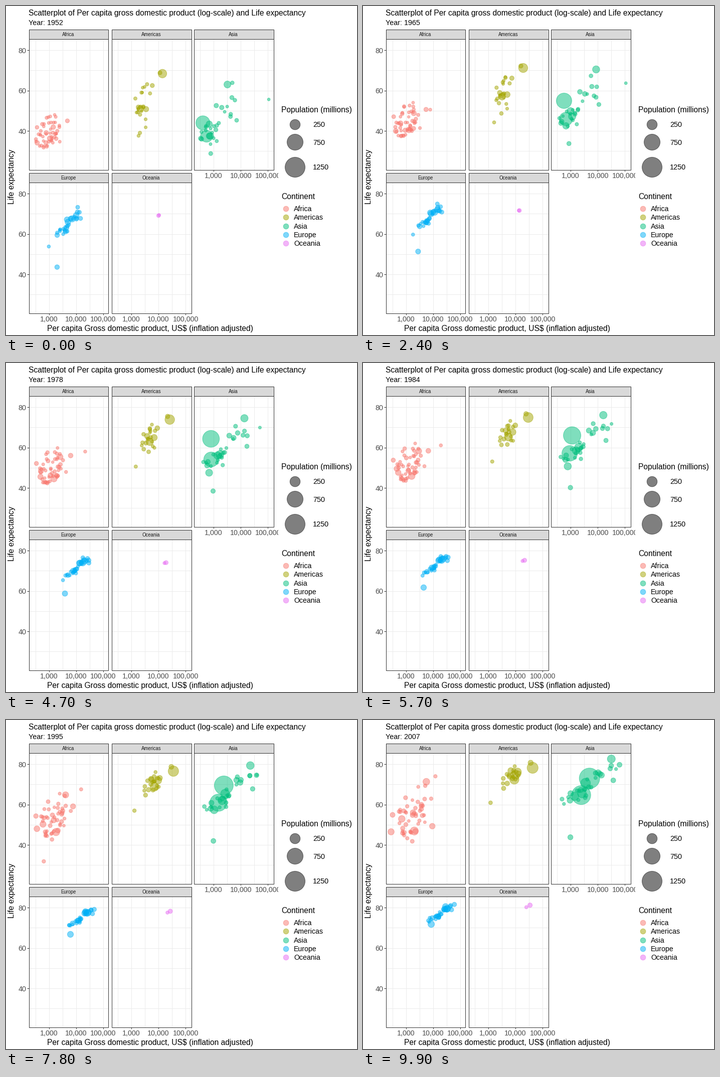
A matplotlib script for the animation above (10000 ms loop, 700x656 px).

```python
import numpy as np
import matplotlib.pyplot as plt
from matplotlib.animation import FuncAnimation
from matplotlib.patches import Rectangle

W, H, DPI = 700, 656, 64
PT = 72 / DPI                      # points per pixel
FRAMES, INTERVAL = 100, 100
FIRST, LAST = 1952, 2007

plt.rcParams["font.family"] = "Liberation Sans"

# Large and outlying bubbles: population in millions (last, or first and last),
# income and life expectancy at the start and the end, then optional bends of
# the path as year, income, life expectancy.
AFRICA = [
    (135, 1077, 36.3, 2014, 46.9, 1982, 1576, 45.8),
    (80, 1419, 41.9, 5581, 71.3),
    (64, 781, 39.1, 278, 46.5),
    (76, 362, 34.1, 691, 52.9),
    (44, 4725, 45, 9270, 49.3, 1992, 7225, 61.9),
    (6, 2388, 42.7, 12057, 74, 1977, 21951, 57.4),
    (9, 493, 40, 863, 46.2, 1987, 848, 44, 1992, 737, 23.6, 1997, 590, 36),
]
AMERICAS = [
    ((157, 301), 13990, 68.4, 42952, 78.2),
    (33, 11367, 68.8, 36319, 80.7),
    (109, 3478, 50.8, 11978, 76.2),
    (190, 2109, 50.9, 9066, 72.4),
    (8.5, 1840, 37.6, 1202, 60.9),
    (40, 5911, 62.5, 12779, 75.3),
]
ASIA = [
    ((556, 1319), 400, 44, 4959, 73, 1962, 488, 48, 1967, 613, 58.4, 1977, 741, 64),
    ((372, 1110), 547, 37.4, 2452, 64.7, 1982, 856, 56.6),
    ((86, 127), 3217, 63, 31656, 82.6, 1967, 9848, 71.4),
    (223, 750, 37.5, 3541, 70.6),
    (150, 684, 37.5, 1391, 64.1, 1977, 660, 46.9),
    (169, 685, 43.4, 2606, 65.5),
    (2.5, 108382, 55.6, 47307, 77.6, 1972, 109348, 67.7, 1982, 31354, 71.3),
    (32, 779, 28.8, 975, 43.8, 1982, 978, 39.9),
    (48, 331, 36.3, 944, 62.1),
]
EUROPE = [
    ((22, 71), 1969, 43.6, 8458, 71.8, 1982, 4241, 61),
    (82, 7144, 67.5, 32170, 79.4),
    (61, 9980, 69.2, 33203, 79.4),
    (58, 4931, 65.9, 28570, 80.5),
    (38, 4029, 61.3, 15390, 75.6, 1982, 8452, 71.3),
    (4.5, 974, 53.8, 7446, 74.9),
]
OCEANIA = [
    ((8.7, 20), 10040, 69.1, 34435, 81.2),
    ((2, 4.1), 10557, 69.4, 25185, 80.2),
]

# colour, column, row, population growth, 1982 bend (income share, life share,
# life lift), large bubbles, then the crowd: count, median population, and for
# start and end the mean log income, its spread, mean life, slope and noise
PANELS = {
    "Africa": ("#F8766D", 0, 0, 3.6, (.5, .22, 9), AFRICA,
               (45, 8, (2.99, .27, 39, 5, 4.4), (3.17, .4, 54.5, 9, 6.5))),
    "Americas": ("#A3A500", 1, 0, 2.9, (.64, .64, 0), AMERICAS,
                 (19, 9, (3.47, .18, 53, 24, 7), (3.9, .24, 73.8, 8, 2.2))),
    "Asia": ("#00BF7D", 2, 0, 2.7, (.6, .66, 0), ASIA,
             (24, 14, (3.2, .36, 47, 14, 6), (3.85, .53, 71.5, 9, 3))),
    "Europe": ("#00B0F6", 0, 1, 1.25, (.68, .63, 0), EUROPE,
               (24, 9, (3.73, .24, 65.7, 13, 2), (4.35, .24, 77.8, 9, .9))),
    "Oceania": ("#E76BF3", 1, 1, 2, (.6, .47, 0), OCEANIA, None),
}


def panel_left(col):
    return 45.4 + 164.1 * col


def to_x(log_income, col):
    return panel_left(col) + (log_income - 2.2484) * 54


def to_y(life, row):
    return 88.1 + 286 * row + (80 - life) * 4.025


def radius(pop):
    return 2.85 + 18.1 * np.sqrt(pop / 1319)


def marker_size(r):
    return (2 * (r - .5) * PT) ** 2


def make_crowd(count, median, *ends):
    """Small bubbles scattered around the trend of their continent."""
    rng = np.random.default_rng(count)

    def normal():
        return np.clip(rng.normal(size=count), -1.8, 1.8)

    pops = np.minimum(median * np.exp(normal()), 50)
    rich, healthy = normal(), normal()
    columns = [pops]
    for mean, spread, life, slope, noise in ends:
        columns += [10 ** (mean + spread * rich), life + slope * spread * rich + noise * healthy]
        rich = .8 * rich + .6 * normal()
        healthy = .7 * healthy + .7 * normal()
    return list(zip(*columns))


def track(bubble, growth, bend):
    """Log income, life expectancy and radius for all frames."""
    pop, g0, l0, g1, l1, *via = bubble
    p0, p1 = pop if isinstance(pop, tuple) else (pop / growth, pop)
    g0, g1 = np.log10([g0, g1])
    if via:
        when, g, l = via[0::3], np.log10(via[1::3]), via[2::3]
    else:
        g_share, l_share, lift = bend
        when = [1982]
        g = [g0 + g_share * (g1 - g0)]
        l = [l0 + lift + l_share * (l1 - l0)]
    keys = [FIRST, *when, LAST]
    t = (years - FIRST) / (LAST - FIRST)
    return (np.interp(years, keys, [g0, *g, g1]),
            np.interp(years, keys, [l0, *l, l1]),
            radius(p0 * (p1 / p0) ** t))


def text(x, y, s, size, color="black", **kw):
    return ax.text(x, y, s, fontsize=size * PT, color=color, zorder=4, **kw)


def line(xs, ys, color, z):
    ax.plot(xs, ys, color=color, lw=PT, zorder=z, solid_capstyle="butt")


def box(x0, y0, x1, y1, fill):
    ax.add_patch(Rectangle((x0, y0), x1 - x0, y1 - y0, fc=fill, ec="#333333", lw=PT, zorder=3.5))


def dots(x, y, r, color):
    return ax.scatter(x, y, s=marker_size(np.asarray(r)), c=color, alpha=.5,
                      edgecolors=color, linewidths=PT, zorder=3)


def draw_panel(name, col, row):
    left, top = round(panel_left(col)) + .5, 46.5 + 286 * row
    right, bottom = left + 159 - (col == 0), top + 280
    for k in np.arange(2.5, 5.1, .5):
        line([to_x(k, col)] * 2, [top + 19, bottom], "#EBEBEB", 1)
    for life in range(30, 81, 10):
        line([left, right], [to_y(life, row)] * 2, "#EBEBEB", 1)
    box(left, top + 19, right, bottom, "none")
    box(left, top, right, top + 19, "#D9D9D9")
    text((left + right) / 2 - .5, top + 13.5, name, 9.5, "#1A1A1A", ha="center")
    if col == 0:
        for life in (40, 60, 80):
            y = to_y(life, row)
            line([left - 3.5, left], [y, y], "#333333", 3)
            text(40.5, y + 5.6, str(life), 14.4, "#4D4D4D", ha="right")
    if row == 1 or col == 2:
        for k in (3, 4, 5):
            x = to_x(k, col)
            line([x, x], [bottom, bottom + 3.5], "#333333", 3)
            text(x, bottom + 16.7, f"{10 ** k:,}", 14.2, "#4D4D4D", ha="center")


def draw_legends():
    text(549, 212, "Population (millions)", 15.6)
    for pop, y in ((250, 235.5), (750, 271), (1250, 320.5)):
        dots([576], [y], [radius(pop)], "black")
        text(612, y + 5.8, str(pop), 14.4)
    text(549, 385, "Continent", 15.6)
    for i, (name, panel) in enumerate(PANELS.items()):
        y = 404.2 + 17.2 * i
        dots([557.5], [y], [5.8], panel[0])
        text(574, y + 5, name, 14.1)


fig = plt.figure(figsize=(W / DPI, H / DPI), dpi=DPI, facecolor="white")
ax = fig.add_axes([0, 0, 1, 1])
ax.set(xlim=(0, W), ylim=(H, 0))
ax.axis("off")

years = np.linspace(FIRST, LAST, FRAMES)
clouds = []
for name, (color, col, row, growth, bend, bubbles, crowd) in PANELS.items():
    draw_panel(name, col, row)
    if crowd:
        bubbles = bubbles + make_crowd(*crowd)
    g, l, r = np.array([track(b, growth, bend) for b in bubbles]).transpose(1, 2, 0)
    x, y = to_x(g, col), to_y(l, row)
    clouds.append((dots(x[0], y[0], r[0], color), np.dstack([x, y]), marker_size(r)))

# the last tick label of the Asia panel is cut off by the legend column
ax.add_patch(Rectangle((543, 329), 10, 18, fc="white", ec="none", zorder=5))

text(45, 19, "Scatterplot of Per capita gross domestic product (log-scale) and Life expectancy", 15.65)
year_text = text(45, 38, "", 14.3)
text(287.5, 648, "Per capita Gross domestic product, US$ (inflation adjusted)", 15.65, ha="center")
text(19.3, 340, "Life expectancy", 15.7, rotation=90, ha="right", va="center")
draw_legends()


def update(i):
    for cloud, places, sizes in clouds:
        cloud.set_offsets(places[i])
        cloud.set_sizes(sizes[i])
    year_text.set_text(f"Year: {round(years[i])}")
    return [c[0] for c in clouds] + [year_text]


anim = FuncAnimation(fig, update, frames=FRAMES, interval=INTERVAL, repeat=True,
                     repeat_delay=0, blit=False)
plt.show()
```
